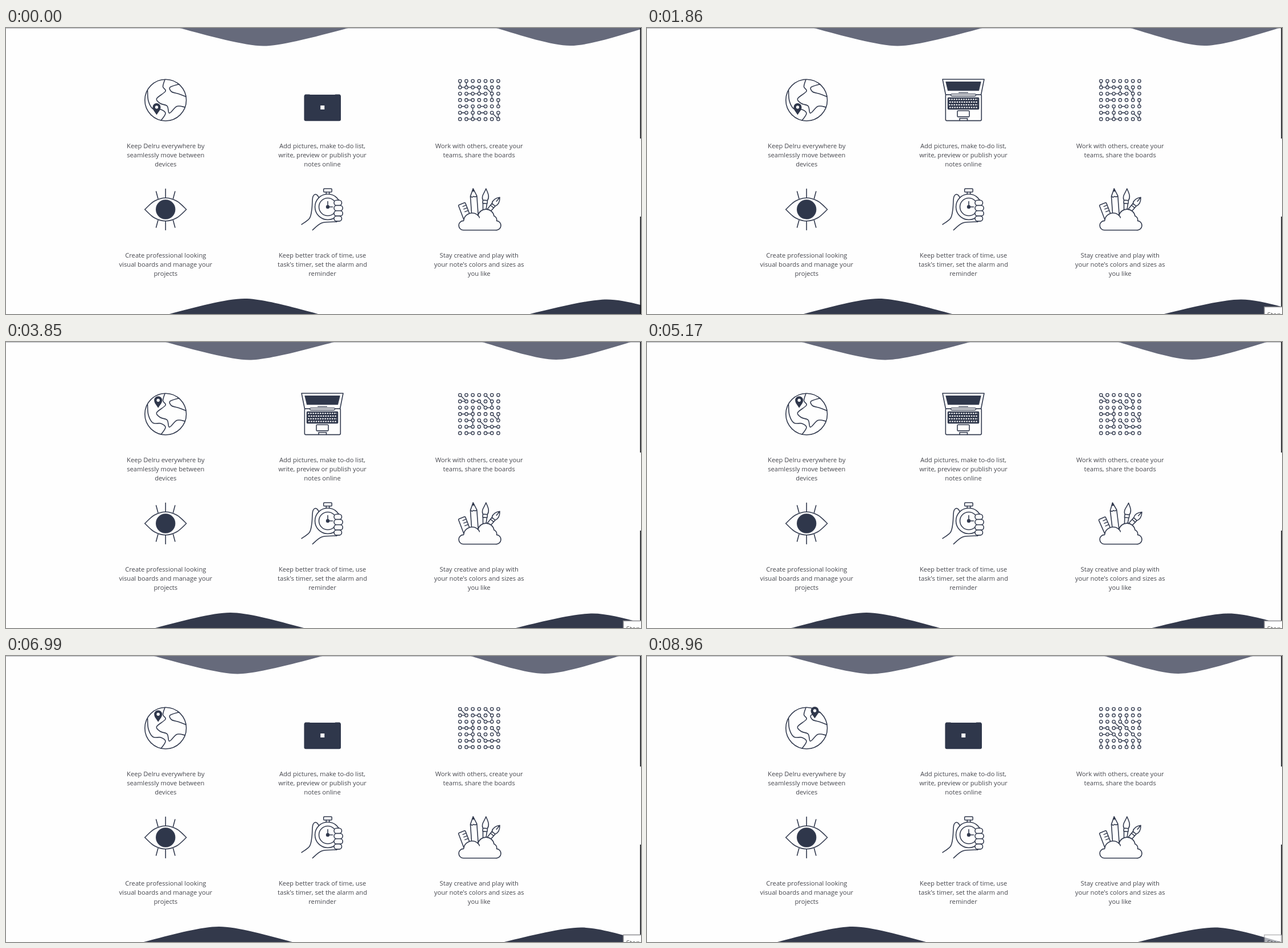
Write an HTML page that moves like this. It is 1115x502 px and loops after 9.03 s.

```html
<!DOCTYPE html>
<html lang="en">
<head>
<meta charset="utf-8">
<title>Features</title>
<style>
  html, body { margin: 0; width: 100%; height: 100%; overflow: hidden; background: #fefefe; }
  svg { display: block; width: 1115px; height: 502px; }
  .ink { fill: none; stroke: #343c50; stroke-width: 1.6; stroke-linecap: round; stroke-linejoin: round; }
  .solid { fill: #2f374b; }
  .paper { fill: #fefefe; }
  .thin { stroke-width: 1.35; }
  .copy { font: 11.2px "Open Sans", "Noto Sans", sans-serif; fill: #46474e; text-anchor: middle; }
  .tip { font: 11.5px "Open Sans", "Noto Sans", sans-serif; fill: #575757; }
</style>
</head>
<body>
<svg id="stage" viewBox="0 0 1115 502"></svg>
<script>
const LOOP = 9030;
const NS = "http://www.w3.org/2000/svg";
const stage = document.getElementById("stage");

// ---- drawing helpers ----
function add(parent, tag, attrs = {}, text = "") {
  const el = document.createElementNS(NS, tag);
  for (const k in attrs) el.setAttribute(k, attrs[k]);
  if (text) el.textContent = text;
  parent.appendChild(el);
  return el;
}
const group = (parent, cls = "ink") => add(parent, "g", { class: cls });
const path = (parent, d, cls = "") => add(parent, "path", { d, class: cls });
const circle = (parent, cx, cy, r, cls = "") => add(parent, "circle", { cx, cy, r, class: cls });
const rect = (parent, x, y, width, height, rx = 0, cls = "") =>
  add(parent, "rect", { x, y, width, height, rx, class: cls });
const times = (n, fn) => Array.from({ length: n }, (_, i) => fn(i));
const move = (el, s) => el.setAttribute("transform", s);

// Smooth curve through a few points.
function curve(...p) {
  const at = i => p[Math.max(0, Math.min(p.length - 1, i))];
  const handle = (i, s) => at(i).map((v, k) => v + s * (at(i + 1)[k] - at(i - 1)[k]) / 6);
  return "M" + p[0] + p.slice(1).map((q, i) => `C${handle(i, 1)} ${handle(i + 1, -1)} ${q}`).join("");
}

// One swell from x0 to x1 with its tip at xp.
function swell(x0, xp, x1, base, tip) {
  const lift = base + (tip - base) * .42;
  return `M${x0} ${base}C${x0 + (xp - x0) * .33} ${lift} ${xp - 32} ${tip} ${xp} ${tip}` +
    `S${x1 - (x1 - xp) * .33} ${lift} ${x1} ${base}Z`;
}

function random(seed) {
  return () => {
    seed = (seed * 16807) % 2147483647;
    return seed / 2147483647;
  };
}

// ---- time helpers ----
const mix = (a, b, p) => a + (b - a) * p;
const ramp = (t, from, span) => Math.min(1, Math.max(0, (t - from) / span));
const ease = (t, from, span) => { const p = ramp(t, from, span); return p * p * (3 - 2 * p); };
const pulse = (t, from, span) => Math.sin(Math.PI * ramp(t, from, span));
const moves = [2500, 7900];

// ---- page ----
function makePage() {
  rect(stage, 0, 0, 1115, 502, 0, "paper");
  rect(stage, 0, 0, 1115, 1).setAttribute("fill", "#b4b5ba");
  const waves = group(stage, "");
  path(waves, swell(305, 452, 601, 0, 31.5) + swell(861, 991, 1122, 0, 31))
    .setAttribute("fill", "#666a7b");
  path(waves, swell(287, 419, 548, 502, 475) + swell(920, 1055, 1172, 502, 476.5))
    .setAttribute("fill", "#33394b");
  path(stage, "M1113.4 0H1115V194H1113.4ZM1113.4 331H1115V502H1113.4Z").setAttribute("fill", "#15161b");

  const copy = group(stage, "copy");
  [
    "Keep Delru everywhere by|seamlessly move between|devices",
    "Add pictures, make to-do list,|write, preview or publish your|notes online",
    "Work with others, create your|teams, share the boards",
    "Create professional looking|visual boards and manage your|projects",
    "Keep better track of time, use|task's timer, set the alarm and|reminder",
    "Stay creative and play with|your note's colors and sizes as|you like"
  ].forEach((caption, i) => caption.split("|").forEach((line, k) => add(copy, "text", {
    x: 280.3 + 275.2 * (i % 3),
    y: 211 + 192 * Math.floor(i / 3) + 16 * k
  }, line)));

  return t => move(waves, `translate(${-t * 58 / 8960} 0)`);
}

function makeGlobe() {
  const g = group(stage);
  circle(g, 280.2, 126.6, 36.4);
  path(g, curve([279, 90.5], [275.5, 103], [280, 111], [264.5, 124], [271, 132.5],
    [283, 137], [287, 149.5], [300, 137.5], [314.5, 139]));
  path(g, curve([248.5, 109.5], [250, 128], [258, 142], [272, 143], [280, 150], [272.5, 162]));
  path(g, curve([304, 98.5], [288, 104], [291, 112], [303, 115.5], [316, 120.5]));

  const pin = group(stage, "");
  path(pin, "M0 0C-3 -5 -7 -8.5 -7 -13.5A7 7 0 0 1 7 -13.5C7 -8.5 3 -5 0 0Z", "solid");
  circle(pin, 0, -13.5, 2.7, "paper");
  const [a, b, c] = [[264.5, 152.5], [267.2, 115.8], [294.6, 109.5]];
  return t => {
    const [p, q] = moves.map(from => ease(t, from, 400));
    move(pin, `translate(${a.map((v, k) => mix(mix(v, b[k], p), c[k], q))})`);
  };
}

function makeLaptop() {
  const base = group(stage);
  rect(base, 524.3, 117, 63, 45.6, 2, "paper");
  rect(base, 528.5, 122.5, 54, 20, 1, "solid");
  times(4, i => add(base, "path", {
    d: `M${530 + i % 2} ${125.3 + 4.75 * i}H${581 - i % 2}`,
    style: "stroke:#fefefe;stroke-width:2.1;stroke-linecap:butt;stroke-dasharray:2.5 1.7"
  }));
  rect(base, 545, 145.3, 21, 10.6, 1.5);
  path(base, "M549 162.5V158.8H562.5V162.5");
  const screen = group(base);
  path(screen, "M519 -27H592L586.6 0H524.4Z", "paper");
  path(screen, "M525 -22.3H586L582.4 -7.4H528.6Z", "solid thin");
  path(screen, "M547.5 -3.7H563.5", "thin");
  rect(base, 533.5, 115.8, 44, 3.7, 1.8, "paper thin");

  const lid = group(stage, "");
  rect(lid, 523.4, 0, 64.6, 46.2, 3, "solid");
  rect(lid, 524.4, -.5, 10, 4, 1.5, "solid");
  rect(lid, 577, -.5, 10, 4, 1.5, "solid");
  rect(lid, 552.2, 19, 7, 7, 0, "paper");
  return t => {
    const tilt = Math.cos(Math.PI * (ease(t, 700, 700) - ease(t, 5800, 700)));
    move(lid, `translate(0 117) scale(1 ${Math.max(tilt, 0)})`);
    move(screen, `translate(0 117) scale(1 ${Math.max(-tilt, 0)})`);
    base.style.display = tilt > .99 ? "none" : "";
    screen.style.display = tilt < 0 ? "" : "none";
  };
}

function makeGrid() {
  const g = group(stage, "ink thin");
  const node = (c, r) => `${797.2 + 11.2 * c} ${93 + 11.15 * r}`;
  const net = seed => {
    const next = random(seed);
    return path(g, times(49, i => {
      const c = i % 7, r = Math.floor(i / 7);
      const linked = next() < .5, way = next();
      const c2 = c + (way < .65 ? 1 : 0), r2 = r + (way > .45 ? 1 : 0);
      return linked && c2 < 7 && r2 < 7 ? `M${node(c, r)}L${node(c2, r2)}` : "";
    }).join(""));
  };
  const nets = [1201, 52711, 90437].map(net);
  times(49, i => {
    const [x, y] = node(i % 7, Math.floor(i / 7)).split(" ");
    circle(g, x, y, 2.7, "paper");
  });
  return t => {
    const shown = [1, ...moves.map(from => ramp(t, from, 250)), 0];
    nets.forEach((el, i) => el.style.opacity = shown[i] - shown[i + 1]);
  };
}

function makeEye() {
  const g = group(stage);
  const lashes = [-1, 1].map(side => path(g, [-1, 0, 1].map(k => {
    const near = side * (20.3 - Math.abs(k)), far = side * (36 - 4.5 * Math.abs(k));
    return `M${13.3 * k} ${near}L${16.6 * k} ${far}`;
  }).join("")));
  const eye = group(g, "");
  path(eye, curve([-36.5, 0], [-20, -14.5], [0, -20.3], [20, -14.5], [36.5, 0])
    + curve([36.5, 0], [20, 14.5], [0, 20.3], [-20, 14.5], [-36.5, 0]));
  circle(eye, 0, 0, 16.4, "solid");
  move(g, "translate(280.2 318.5)");
  return t => {
    const shut = pulse(t, 3250, 400) + pulse(t, 3950, 400);
    move(eye, `scale(1 ${1 - .93 * shut})`);
    lashes.forEach((el, i) => move(el, `translate(0 ${(i ? -10 : 10) * shut})`));
  };
}

function makeWatch() {
  const g = group(stage);
  path(g, curve([519, 344.8], [533, 334], [537, 318], [538.7, 297], [544, 292], [549, 297], [548.5, 302]));
  path(g, curve([538.3, 354.6], [555, 342], [581, 340.2]));
  path(g, "M562.3 288V292M567.7 288V292");
  rect(g, 557.7, 282, 14.4, 6, 1.3);
  circle(g, 565, 314, 22.5, "paper");
  circle(g, 565, 314, 15.5);
  path(g, "M565 304.5V314H573.5");
  circle(g, 565, 314, 2.4, "solid");
  times(4, i => rect(g, 576, 302.3 + 9.2 * i, 13.5 + 2 * Math.sin(Math.PI * i / 3), 9.2, 4.5, "paper"));
}

function makeTools() {
  const g = group(stage);
  // Each tool hangs down from its tip, then leans about it.
  const tool = (x, y, lean, ...parts) => {
    const outer = group(g, "");
    const inner = group(outer, "");
    move(inner, `translate(${x} ${y}) rotate(${lean})`);
    parts.forEach(([d, cls]) => path(inner, d, cls));
    return outer;
  };
  const brush = "M0 0C3.5 7 8 13 4 20.5H-4C-8 13 -2 8 0 0ZM-4 20.5V26H4V20.5M-3.5 26L-2.5 40M3.5 26L2.5 40";
  const tools = [
    tool(800.2, 308.6, -21, ["M-6.5 36V1.5Q-6.5 0 -5 0H5Q6.5 0 6.5 1.5V36"],
      [times(3, i => `M0 ${5 + 5 * i}H6.5`).join(""), "thin"]),
    tool(820.2, 282, -4, ["M0 0L-5.7 13V46H5.7V13ZM-5.7 13Q-3 16 0 13.5Q3 16 5.7 13"],
      ["M0 0L-1.8 4.5H1.8Z", "solid thin"]),
    tool(842.8, 282, 4, [brush]),
    tool(867, 297.3, 40, ["M0 0C6 7 6.5 12 3.7 17H-3.7C-6.5 12 -6 7 0 0V9M-3.7 17V21H3.7V17M-3.7 21L-3 40M3.7 21L3 40"])
  ];
  path(g, "M803 354.8A8.2 8.2 0 0 1 803.5 338.4A15 15 0 0 1 828.7 329A14.5 14.5 0 0 1 857 330" +
    "A7 7 0 0 1 861.5 338.4A8.2 8.2 0 0 1 860 354.8Z", "paper");
  path(g, "M828.7 329Q831 330.5 831.3 333");
  return t => tools.forEach((el, i) =>
    move(el, `rotate(${(i < 2 ? -3 : 3) * pulse(t, 4870, 600)} ${813 + 11 * i} 335)`));
}

function makeTip() {
  const g = group(stage, "");
  add(g, "rect", { x: 1084, y: 489.5, width: 40, height: 30, fill: "#fff", stroke: "#8b8b8f", "stroke-width": 1.5 });
  add(g, "text", { x: 1089, y: 507, class: "tip" }, "Stop");
  return t => g.style.opacity = ramp(t, 450, 200) - .4 * ramp(t, 8830, 130);
}

makeWatch();
const parts = [makePage, makeGlobe, makeLaptop, makeGrid, makeEye, makeTools, makeTip].map(make => make());
stage.appendChild(stage.firstChild);

const start = performance.now();
function tick() {
  const t = (performance.now() - start) % LOOP;
  parts.forEach(draw => draw(t));
  requestAnimationFrame(tick);
}
tick();
</script>
</body>
</html>
```
